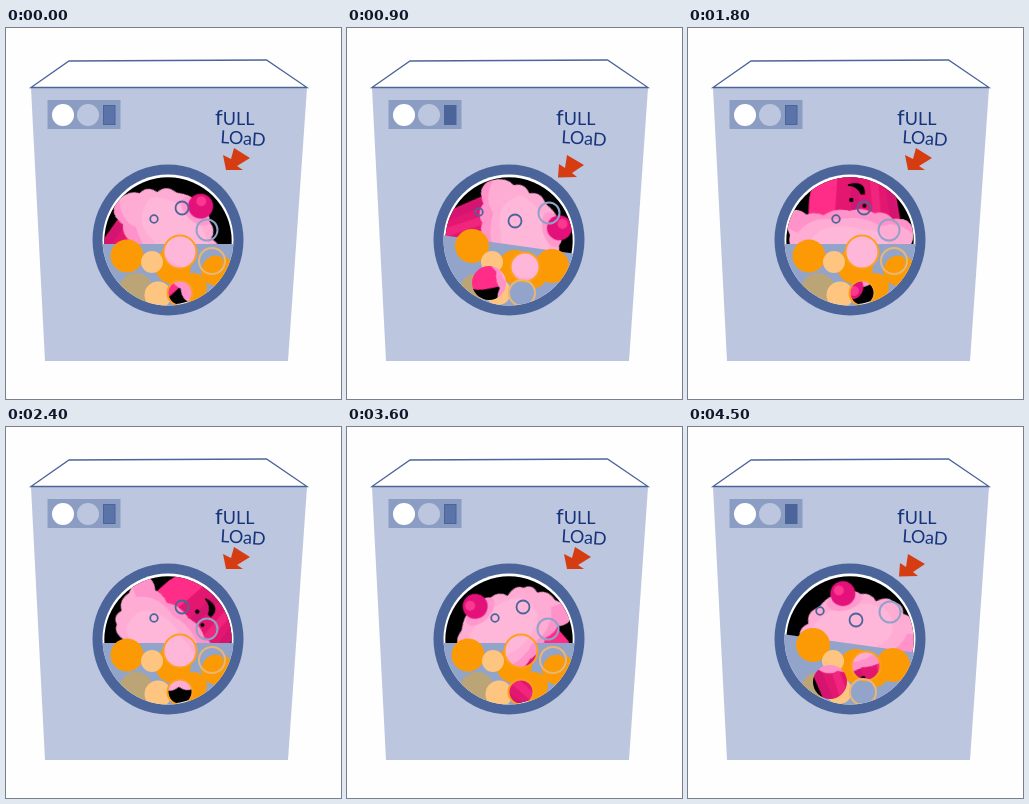
Write an HTML page that moves like this. It is 335 px wide and 371 px high and loops after 4800 ms.

```html
<!DOCTYPE html>
<html lang="en">
<head>
<meta charset="utf-8">
<title>Full load</title>
<style>
  html, body { margin: 0; width: 100%; height: 100%; overflow: hidden; background: #fefefe; }
  svg { display: block; width: 335px; height: 371px; }
  text { font-family: Lato, "Open Sans", sans-serif; fill: #16347c; }

  .orange { fill: #fc9a06; }
  .cream { fill: #fdc580; }
  .tan { fill: #bba576; }
  .water { fill: #93a4ca; }
  .ring { fill: none; stroke: #4b659b; stroke-width: 1.8; }
  .pale { stroke: #91a2c9; stroke-width: 2; }
  .amber { stroke: #fca01c; stroke-width: 2; }
  .sand { stroke: #e9b674; stroke-width: 2; }
  .red { fill: #d53c12; }

  /* The cake turns an eighth every 600 ms, then rocks back and aside halfway. */
  .spin { animation: spin 4.8s steps(8) infinite; }
  .rock { animation: rock .6s step-end infinite; }
  .sway { animation: sway .6s step-end infinite; }
  @keyframes spin { from { transform: rotate(44deg); } to { transform: rotate(404deg); } }
  @keyframes rock { 50% { transform: rotate(-14deg); } }
  @keyframes sway { 50% { transform: translate(5px, 0); } }

  /* The water goes level, left, level, right. */
  .level { animation: level .6s step-end infinite; }
  .tilted { animation: tilted .6s step-end infinite; }
  .left { animation: left 1.2s step-end infinite; }
  .right { animation: right 1.2s step-end infinite; }
  @keyframes level { 0% { visibility: visible; } 50%, 100% { visibility: hidden; } }
  @keyframes tilted { 0% { visibility: hidden; } 50%, 100% { visibility: visible; } }
  @keyframes left { 0%, 50%, 100% { visibility: hidden; } 25% { visibility: visible; } }
  @keyframes right { 0% { visibility: hidden; } 75%, 100% { visibility: visible; } }
</style>
</head>
<body>
<svg viewBox="0 0 335 371">
  <defs>
    <clipPath id="drum"><circle cx="162" cy="212" r="65.5"/></clipPath>
    <clipPath id="glass"><circle cx="162" cy="213" r="63.7"/></clipPath>
    <clipPath id="cup"><path d="M-52 10H42L40 42Q38 56 26 64L14 78H-34L-46 50Z"/></clipPath>
    <clipPath id="icing"><use href="#cream-top"/></clipPath>

    <mask id="levelHoles" maskUnits="userSpaceOnUse" x="90" y="140" width="145" height="145">
      <rect x="90" y="140" width="145" height="145" fill="#fff"/>
      <circle cx="174" cy="224" r="16.5"/><circle cx="174" cy="265" r="12"/>
    </mask>
    <mask id="leftHoles" maskUnits="userSpaceOnUse" x="90" y="140" width="145" height="145">
      <rect x="90" y="140" width="145" height="145" fill="#fff"/>
      <circle cx="142" cy="254" r="16.5"/><circle cx="174" cy="264" r="12.5"/>
    </mask>
    <mask id="rightHoles" maskUnits="userSpaceOnUse" x="90" y="140" width="145" height="145">
      <rect x="90" y="140" width="145" height="145" fill="#fff"/>
      <circle cx="142" cy="255" r="17"/><circle cx="178" cy="239" r="14"/>
    </mask>
  </defs>

  <!-- Cabinet -->
  <path d="M25 60H301L282 333H39Z" fill="#bdc6df"/>
  <path d="M25 59.5 63 33 260.5 32 301 59.5Z" fill="#fff" stroke="#4b659b" stroke-width="1.3"/>
  <rect x="41.5" y="72" width="73" height="29" fill="#8c9dc4"/>
  <circle cx="57" cy="87" r="11" fill="#fff"/>
  <circle cx="82" cy="87" r="11" fill="#bdc6df"/>
  <rect x="97.5" y="77.5" width="11.5" height="19" fill="#5a74aa" stroke="#4b659b"/>
  <rect class="tilted" x="97" y="77" width="12" height="20" fill="#4b659b"/>
  <text x="209" y="97" font-size="18"><tspan font-size="22">f</tspan>ULL</text>
  <text x="214" y="115" font-size="18" transform="rotate(4 214 115)">LOaD</text>
  <path class="red level" d="M228 120 244 130 231 138 237 142 220 142 217 127 225 131Z"/>
  <path class="red tilted" d="M220 127 237 137 225 145 230 149 211 149.5 212 136 218 140Z"/>

  <!-- Door -->
  <circle cx="162" cy="212" r="75.5" fill="#4b659b"/>
  <circle cx="162" cy="212" r="65.5" fill="#fff"/>
  <g clip-path="url(#glass)">
    <rect x="95" y="145" width="135" height="135"/>
    <g transform="translate(162 212)"><g class="sway"><g class="spin"><g class="rock">
      <g clip-path="url(#cup)">
        <rect x="-55" y="10" width="110" height="70" fill="#e3176f"/>
        <path d="M16 10H50V80H10Z" fill="#ff2d87"/>
        <path d="M-46 12-37 78M-5 12-7 78" stroke="#d41470" stroke-width="8"/>
        <path d="M-28 12-24 78" stroke="#f0267e" stroke-width="8"/>
      </g>
      <path d="M-15 46Q-16 59 1 55Q-9 54-12 46Z" stroke="#000" stroke-width="1.5"/>
      <circle cx="-2" cy="40" r="2.2"/><circle cx="-15" cy="34" r="2"/>
      <path id="cream-top" fill="#ffacd4" d="M-63 10Q-65-8-53-14Q-53-25-41-27Q-40-39-27-40
        Q-14-50 0-48Q12-49 17-42Q28-41 30-31Q44-34 47-25Q56-22 53-12Q63-6 60 6
        Q66 18 60 29Q52 34 43 26Q35 29 26 25Q14 33 0 29Q-14 33-25 26Q-36 29-43 20Q-60 22-63 10Z"/>
      <g clip-path="url(#icing)">
        <path fill="#ff92c9" d="M-66 2Q-48 20-32 13Q-8 27 12 20Q38 26 52 8L68 16 46 38H-60Z"/>
        <path fill="#ffb7d9" d="M-42-18Q-26-36 1-34Q25-33 38-20Q46 4 26 11Q6 17-11 10Q-39 12-42-18Z"/>
        <ellipse cy="-40" rx="18" ry="10" fill="#ff98cc"/>
      </g>
      <circle cy="-47" r="12.5" fill="#e4117a"/>
      <circle cx="-3" cy="-51" r="5" fill="#fa388f"/>
    </g></g></g></g>
  </g>

  <!-- Water and bubbles -->
  <g clip-path="url(#drum)">
    <g class="level">
      <g mask="url(#levelHoles)">
        <rect class="water" x="95" y="216" width="135" height="65"/>
        <circle class="tan" cx="130" cy="262" r="17"/>
        <circle class="orange" cx="167" cy="238" r="18"/>
        <circle class="orange" cx="187" cy="259" r="14"/>
        <circle class="orange" cx="211" cy="242" r="16"/>
        <circle class="water" cx="206" cy="233" r="13"/>
        <ellipse class="orange" cx="207" cy="237" rx="11.5" ry="8.5" transform="rotate(-35 207 237)"/>
        <circle class="orange" cx="121" cy="228" r="16.5"/>
        <circle class="cream" cx="146" cy="234" r="11"/>
        <circle class="cream" cx="152" cy="267" r="13.5"/>
      </g>
      <circle class="ring amber" cx="174" cy="224" r="16.5"/>
      <circle class="ring amber" cx="174" cy="265" r="12.5"/>
      <circle class="ring sand" cx="206" cy="233" r="13"/>
      <circle class="ring" cx="148" cy="191" r="3.8"/>
      <circle class="ring" cx="176" cy="180" r="6.5"/>
      <circle class="ring pale" cx="201" cy="202" r="10.5"/>
    </g>

    <g class="left">
      <g mask="url(#leftHoles)">
        <path class="water" d="M95 228 230 208V281H95Z"/>
        <circle class="tan" cx="130" cy="261" r="14"/>
        <circle class="orange" cx="135" cy="225" r="16"/>
        <circle class="orange" cx="168" cy="238" r="16"/>
        <circle class="orange" cx="209" cy="226" r="16"/>
        <circle class="orange" cx="189" cy="257" r="12"/>
        <circle class="cream" cx="145" cy="234" r="11"/>
        <circle class="cream" cx="153" cy="249" r="13"/>
      </g>
      <circle class="ring amber" cx="174" cy="264" r="13"/>
      <circle class="ring" cx="146" cy="180" r="3.8"/>
      <circle class="ring" cx="168" cy="193" r="6.5"/>
      <circle class="ring pale" cx="200" cy="202" r="10.5"/>
    </g>

    <g class="right">
      <g mask="url(#rightHoles)">
        <path class="water" d="M95 207 230 226V281H95Z"/>
        <circle class="tan" cx="128" cy="260" r="14"/>
        <circle class="orange" cx="125" cy="218" r="17"/>
        <circle class="orange" cx="168" cy="239" r="17"/>
        <circle class="orange" cx="205" cy="238" r="17"/>
        <circle class="orange" cx="187" cy="247" r="13"/>
        <circle class="cream" cx="145" cy="234" r="11"/>
        <circle class="cream" cx="151" cy="264" r="13"/>
        <circle class="water" cx="175" cy="265" r="13"/>
      </g>
      <circle class="ring amber" cx="178" cy="239" r="14.5"/>
      <circle class="ring sand" cx="175" cy="265" r="13"/>
      <circle class="ring" cx="132" cy="184" r="3.8"/>
      <circle class="ring" cx="168" cy="193" r="6.5"/>
      <circle class="ring pale" cx="202" cy="185" r="10.5"/>
    </g>
  </g>
</svg>
</body>
</html>
```
